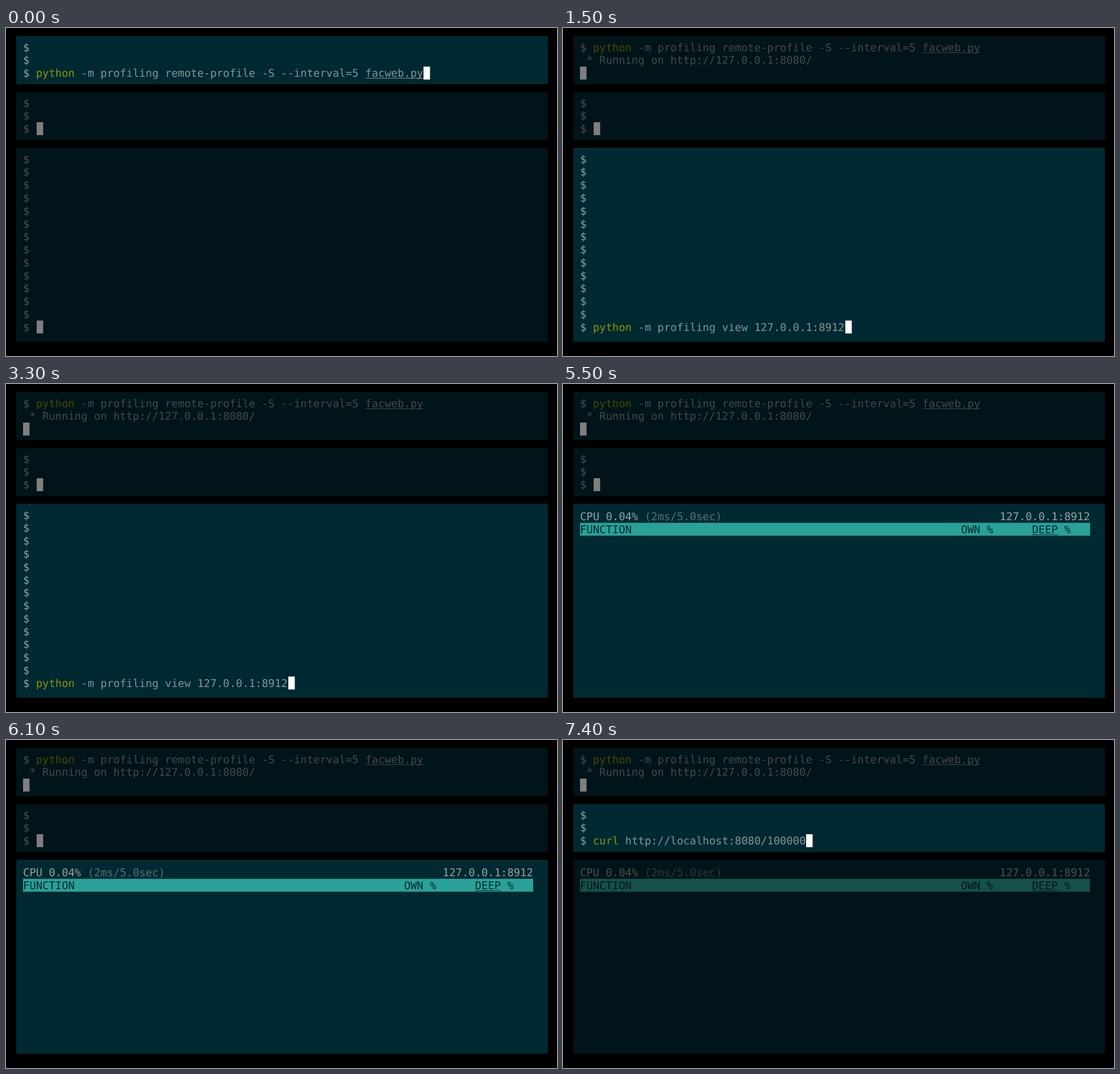
Recreate the animation shown at these times as an HTML page with a canvas. Size 970 px wide and 578 px high, loop 8 s.

```html
<!DOCTYPE html>
<html lang="en">
<head>
<meta charset="utf-8">
<title>Profiling in three terminals</title>
<style>
  html, body { margin: 0; width: 100%; height: 100%; overflow: hidden; background: #000; }
  canvas { display: block; }
</style>
</head>
<body>
<canvas id="stage" width="970" height="578"></canvas>
<script>
const ctx = document.getElementById('stage').getContext('2d');
const LOOP = 8000, LEFT = 30, CELL = 11.367, ROW = 22.77;
const BG = '#002932', TEXT = '#839496', BRIGHT = '#93a1a1', FAINT = '#586e75';
const GREEN = '#8a9600', TEAL = '#2aa198';

const colX = col => LEFT + col * CELL;

function write(col, top, text, color = TEXT, underline = false) {
  ctx.fillStyle = color;
  ctx.fillText(text, colX(col), top + 18.2);
  if (underline) ctx.fillRect(colX(col), Math.round(top + 20), text.length * CELL, 1);
}

function cursor(col, top) {
  ctx.fillStyle = '#fff';
  ctx.fillRect(Math.ceil(colX(col)), top, 11.4, ROW);
}

function prompts(top, count) {
  for (let i = 0; i < count; i++) write(0, top + i * ROW, '$', BRIGHT);
}

// Inactive panels are dimmed by half.
function panel(y, height, active, draw) {
  ctx.fillStyle = BG;
  ctx.beginPath();
  ctx.roundRect(18, y, 936, height, 3);
  ctx.fill();
  draw();
  if (!active) {
    ctx.fillStyle = 'rgba(0, 0, 0, 0.5)';
    ctx.fillRect(18, y, 936, height);
  }
}

function server(t) {
  const top = 22.5, started = t >= 500;
  const line = started ? top : top + 2 * ROW;
  prompts(top, started ? 1 : 3);
  write(2, line, 'python', GREEN);
  write(9, line, '-m profiling remote-profile -S --interval=5');
  write(53, line, 'facweb.py', TEXT, true);
  if (started) write(1, top + ROW, '* Running on http://127.0.0.1:8080/');
  cursor(started ? 0 : 62, top + 2 * ROW);
}

function client(t) {
  const top = 120.5, line = top + 2 * ROW, typed = t >= 6500;
  prompts(top, 3);
  if (typed) {
    write(2, line, 'curl', GREEN);
    write(7, line, 'http://localhost:8080/100000');
  }
  cursor(typed ? 35 : 2.1, line);
}

function shell(t) {
  const top = 219.5, line = top + 13 * ROW, typed = t >= 1500;
  prompts(top, 14);
  if (typed) {
    write(2, line, 'python', GREEN);
    write(9, line, '-m profiling view 127.0.0.1:8912');
  }
  cursor(typed ? 41 : 2.1, line);
}

function viewer(t) {
  const top = 221.8, header = top + ROW;
  ctx.fillStyle = TEAL;
  ctx.fillRect(LEFT, header, 79 * CELL, ROW);
  write(0, header, 'FUNCTION', BG);
  write(59, header, 'OWN %', BG);
  write(70, header, 'DEEP', BG, true);
  write(75, header, '%', BG);
  if (t < 5500) {
    cursor(0, header + ROW);
    write(32, header + 2 * ROW, '- Not Available -', FAINT);
  } else {
    write(0, top, 'CPU 0.04%', BRIGHT);
    write(10, top, '(2ms/5.0sec)', FAINT);
    write(65, top, '127.0.0.1:8912', BRIGHT);
  }
}

function frame() {
  const t = performance.now() % LOOP;
  ctx.font = '18.88px "DejaVu Sans Mono", monospace';
  ctx.textRendering = 'geometricPrecision';
  ctx.fillStyle = '#000';
  ctx.fillRect(0, 0, 970, 578);
  panel(14, 85, t < 1500, () => server(t));
  panel(113, 84.5, t >= 6500, () => client(t));
  panel(211, 342, t >= 1500 && t < 6500, () => (t < 4500 ? shell : viewer)(t));
  requestAnimationFrame(frame);
}
frame();
</script>
</body>
</html>
```
